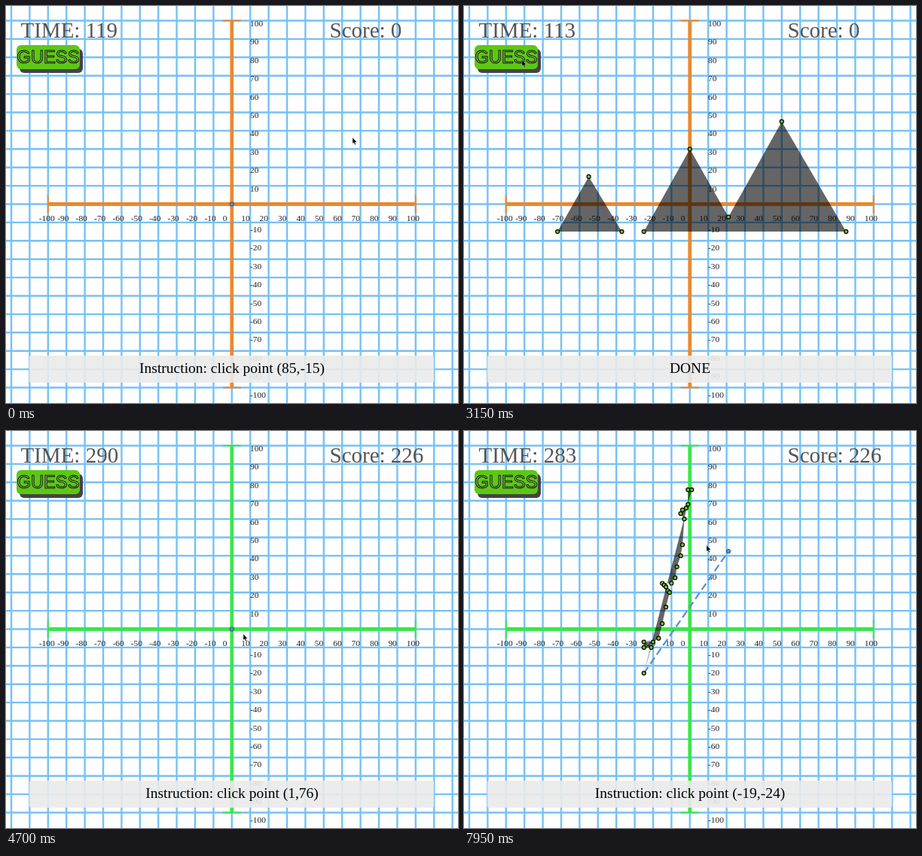
These frames come from a looping animation (600x528 px, 8 s). An HTML page with a canvas:

```html
<!DOCTYPE html>
<html lang="en">
<head>
<meta charset="utf-8">
<title>Coordinate game</title>
<style>
html, body { margin: 0; width: 100%; height: 100%; overflow: hidden; background: #fff; }
canvas { display: block; }
</style>
</head>
<body>
<canvas id="stage" width="600" height="528"></canvas>
<script>
const ctx = document.getElementById('stage').getContext('2d');
const LOOP = 8000, STEP = 50, GUESS_AT = 3250, LEVEL2_AT = 4350;
const CX = 299.8, CY = 263.5, UNIT = 2.44, GROUND = -15;
const SERIF = '"Liberation Serif", "Times New Roman", serif';
const SANS = '"Liberation Sans", Arial, sans-serif';

const px = u => CX + u * UNIT;
const py = v => CY - v * UNIT;
const toStage = ([u, v]) => [px(u), py(v)];
const clamp01 = x => Math.max(0, Math.min(1, x));
const ease = p => p * p * (3 - 2 * p);
const mix = (a, b, p) => a + (b - a) * p;

const peaks = [
  { x: -55, y: 15, half: 17.5 },
  { x: 0, y: 30, half: 25 },
  { x: 50, y: 45, half: 35 }
];

function mountainPoints([a, b, c]) {
  const foot = (peak, side) => [Math.round(peak.x + side * peak.half), GROUND];
  const top = peak => [peak.x, peak.y];
  return [foot(c, 1), foot(a, -1), top(a), foot(a, 1), foot(b, -1), top(b), [21, -7], top(c)];
}

// Each corner may ask for several evenly spaced clicks on the way to it.
function outline(corners) {
  return corners.flatMap(([x, y, steps = 1], i) => {
    const [x0, y0] = corners[Math.max(0, i - 1)];
    return Array.from({ length: steps }, (_, k) => {
      const p = (k + 1) / steps;
      return [Math.round(mix(x0, x, p)), Math.round(mix(y0, y, p))];
    });
  });
}

const levels = [
  {
    axis: '#e98930', firstClick: 250, clickStep: 270, moved: 200,
    time: t => 119 - Math.floor((Math.min(t, GUESS_AT) + 100) / 500),
    points: mountainPoints(peaks)
  },
  {
    axis: '#3ae64e', firstClick: 5260, clickStep: 110, moved: 5000,
    time: t => 290 - Math.floor((t - LEVEL2_AT) / 500),
    points: outline([
      [1, 76], [-1, 76], [-1, 68], [-5, 63, 3], [-3, 60], [-4, 46], [-8, 28, 3],
      [-10, 25], [-15, 25], [-11, 20, 4], [-17, -5, 3], [-20, -7],
      [-25, -7], [-25, -10], [-21, -10], [-25, -24], [-19, -24]
    ])
  }
];

// time, x, y
const cursorKeys = [
  [0, 460, 175], [1750, 474, 170.5], [1800, 480, 347], [3000, 77, 72], [3300, 77, 72],
  [4150, 119, 140], [4650, 315, 270], [4950, 315, 270], [6450, 192, 332],
  [7900, 351, 160], [7950, 322, 152], [LOOP, 300, 150]
];

// Eased travel between keys; long stretches also swing back and forth.
function cursorAt(t) {
  const i = Math.max(1, cursorKeys.findIndex(k => k[0] >= t));
  const [t0, x0, y0] = cursorKeys[i - 1], [t1, x1, y1] = cursorKeys[i];
  const p = clamp01((t - t0) / (t1 - t0));
  const swing = t1 - t0 > 1400 ? 4 * p * (1 - p) : 0;
  return [
    mix(x0, x1, ease(p)) - 90 * swing * Math.sin(p * Math.PI * 6),
    mix(y0, y1, ease(p)) + 70 * swing * Math.sin(p * Math.PI * 5)
  ];
}

function text(str, x, y, size, color, align = 'left', family = SERIF) {
  ctx.font = `${size}px ${family}`;
  ctx.textAlign = align;
  ctx.fillStyle = color;
  ctx.fillText(str, x, y);
}

function line(x0, y0, x1, y1, color, width) {
  ctx.strokeStyle = color;
  ctx.lineWidth = width;
  ctx.beginPath();
  ctx.moveTo(x0, y0);
  ctx.lineTo(x1, y1);
  ctx.stroke();
}

function polygon(pts, color) {
  ctx.fillStyle = color;
  ctx.beginPath();
  pts.forEach(([x, y]) => ctx.lineTo(x, y));
  ctx.closePath();
  ctx.fill();
}

function dot(x, y, fill, stroke) {
  ctx.beginPath();
  ctx.arc(x, y, 2.5, 0, Math.PI * 2);
  ctx.fillStyle = fill;
  ctx.fill();
  ctx.strokeStyle = stroke;
  ctx.lineWidth = 1.2;
  ctx.stroke();
}

function box(x, y, w, h, r, color) {
  ctx.fillStyle = color;
  ctx.beginPath();
  ctx.roundRect(x, y, w, h, r);
  ctx.fill();
}

function drawGrid(axis) {
  for (let u = -120; u <= 120; u += 10) {
    line(px(u), 0, px(u), 528, '#76c1f6', 2.4);
    line(0, py(u), 600, py(u), '#76c1f6', 2.4);
  }
  line(px(-100), CY, px(100), CY, axis, 4.8);
  line(CX, py(100), CX, py(-100), axis, 4.8);
  for (const u of [-100, 100]) {
    line(px(u), CY - 12, px(u), CY + 12, axis, 2);
    line(CX - 12, py(u), CX + 12, py(u), axis, 2);
  }
  for (let u = -100; u <= 100; u += 10) {
    text(u, px(u) - 12, 286, 11.4, '#222');
    if (u) text(u, 324, py(u) + (u > 0 ? 7.5 : 13), 11.4, '#222');
  }
}

function drawButton() {
  box(18, 57, 84, 32, 6, '#444');
  box(14, 52, 84, 32, 6, '#5cc814');
  text('GUESS', 56, 76, 23.7, '#8ccc58', 'center', SANS);
  ctx.strokeStyle = '#111';
  ctx.lineWidth = 1;
  ctx.strokeText('GUESS', 56, 76);
}

function pyramid({ x, y, half }) {
  const left = [x - half, GROUND], right = [x + half, GROUND];
  const fold = [x - 0.4 * half, GROUND];
  polygon([left, [x, y], right].map(toStage), '#e5ca04');
  polygon([left, [x, y], fold].map(toStage), '#b99503');
}

function drawReward(t) {
  ctx.globalAlpha = clamp01((t - GUESS_AT) / 300);
  peaks.forEach(pyramid);
  ctx.globalAlpha = clamp01((t - GUESS_AT - 200) / 300);
  ctx.fillStyle = 'rgba(108,212,50,.82)';
  ctx.beginPath();
  ctx.ellipse(300.5, CY, 48.5, 18, 0, 0, Math.PI * 2);
  ctx.fill();
  text('Next level!', 304, 269, 15, '#e4f3d4', 'center');
  ctx.globalAlpha = 1;
}

function drawCursor([x, y]) {
  const arrow = [[0, 0], [0, 8], [1.8, 6.5], [3, 9.6], [4.4, 9], [3.2, 6.1], [5.6, 6]];
  polygon(arrow.map(([dx, dy]) => [x + dx, y + dy]), '#000');
  ctx.globalCompositeOperation = 'source-over';
  ctx.strokeStyle = 'rgba(255,255,255,.6)';
  ctx.lineWidth = 0.5;
  ctx.stroke();
}

function draw(t) {
  const level = levels[t < LEVEL2_AT ? 0 : 1];
  const guessed = t >= GUESS_AT && t < LEVEL2_AT;
  const clicks = Math.floor((t - level.firstClick) / level.clickStep) + 1;
  const count = Math.max(0, Math.min(level.points.length, clicks));
  const placed = level.points.slice(0, count).map(toStage);
  const next = level.points[count];

  ctx.fillStyle = '#fefefe';
  ctx.fillRect(0, 0, 600, 528);
  drawGrid(level.axis);

  text('TIME: ' + level.time(t), 19.5, 41.5, 29, '#555');
  text('Score: ' + (t < GUESS_AT ? 0 : 226), 429.5, 41.5, 29, '#555');
  if (!guessed) drawButton();

  if (count > 2 && !guessed) polygon(placed, 'rgba(0,0,0,.6)');
  if (next) {
    // the pending point trails the pointer by one step
    const [x, y] = t < level.moved ? [CX, CY] : cursorAt(t - STEP);
    if (count) {
      ctx.setLineDash([10, 5]);
      line(...placed[count - 1], x, y, '#5a94cb', 2.3);
      ctx.setLineDash([]);
    }
    dot(x, y, '#5b9bd5', '#34597c');
  }
  placed.forEach(([x, y]) => dot(x, y, '#6cc826', '#000'));
  if (guessed) drawReward(t);

  box(31, 465, 537, 36, 2, 'rgba(234,234,234,.9)');
  text(next ? `Instruction: click point (${next})` : 'DONE', 300, 488, 19.5, '#000', 'center');
  drawCursor(cursorAt(t));
}

const start = performance.now();
function tick() {
  const t = (performance.now() - start) % LOOP;
  draw(Math.floor(t / STEP) * STEP);
  requestAnimationFrame(tick);
}
tick();
</script>
</body>
</html>
```
